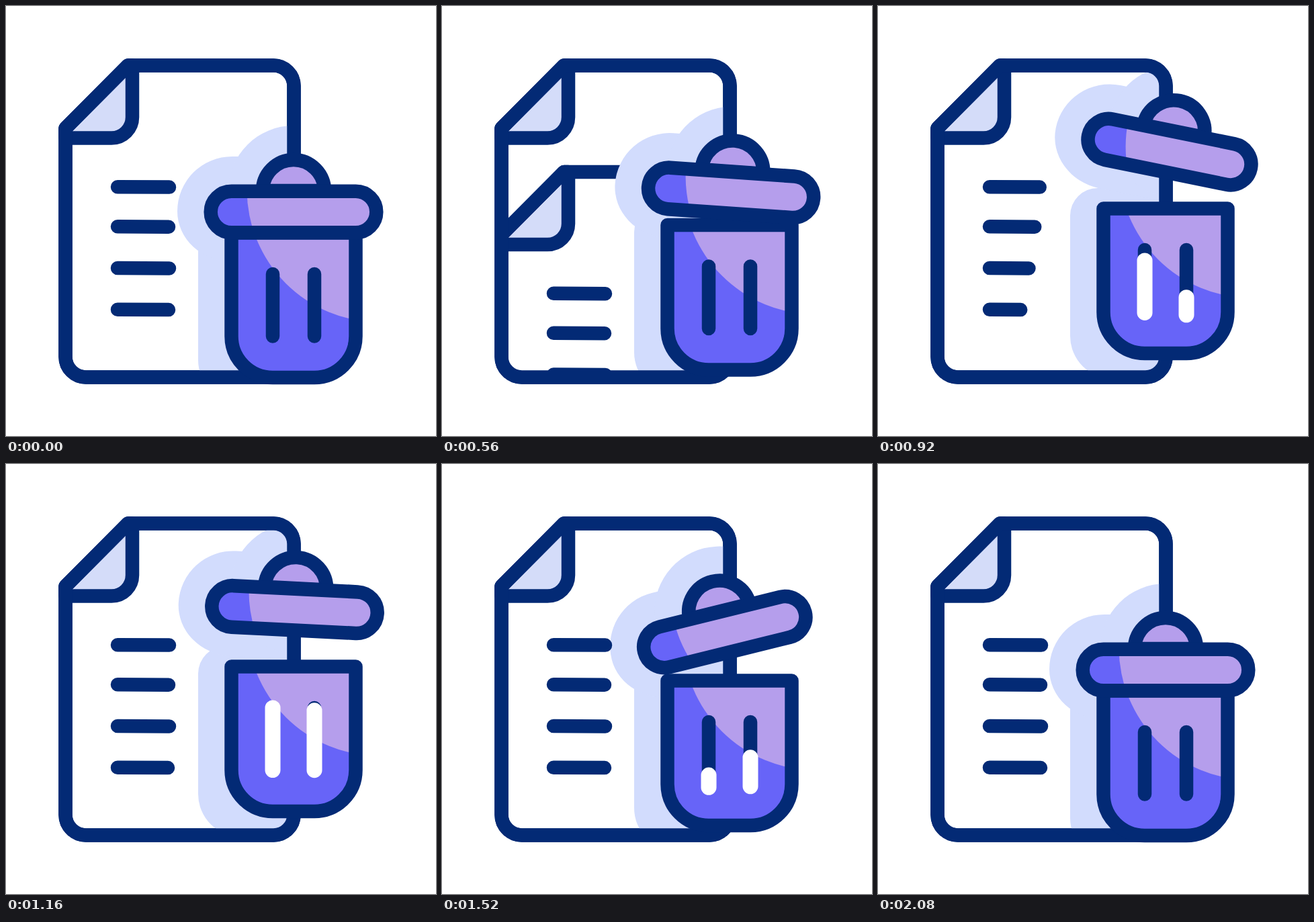
Animation, 640 px wide and 640 px high, one loop 2.4 s. Source, as an HTML page:

```html
<!DOCTYPE html>
<html lang="en">
<head>
<meta charset="utf-8">
<title>Delete document</title>
<style>
  html, body { margin: 0; width: 100%; height: 100%; overflow: hidden; background: #fff; }
  svg { display: block; width: 100%; height: 100%; }
  .ink { fill: none; stroke: #032a75; stroke-width: 20.5; stroke-linecap: round; stroke-linejoin: round; }
  .tongue { stroke: #fff; stroke-width: 23; }
  .paper { fill: #fff; }
  .fold { fill: #d4dcf9; }
  .shade { fill: #d2dcfd; }
  .deep { fill: #6764f8; }
  .light { fill: #b59eec; }
</style>
</head>
<body>
<svg viewBox="0 0 640 640">
  <defs>
    <path id="sheet" d="M181.5 88.5H398a30.5 30.5 0 0 1 30.5 30.5V522a30.5 30.5 0 0 1-30.5 30.5H119A30.5 30.5 0 0 1 88.5 522V182Z"/>
    <path id="flap" d="M188 88.5V165.500a31 31 0 0 1-31 31H88.500V182L181.500 88.500Z"/>
    <path id="can" d="M335.500 337.500H520.500V491.500a61.500 61.500 0 0 1-61.500 61.500H397a61.500 61.500 0 0 1-61.500-61.500Z"/>
    <rect id="cap" x="304.700" y="275.700" width="246.600" height="61.600" rx="30.800"/>
    <g id="page">
      <use href="#sheet" class="paper"/>
      <use href="#flap" class="fold"/>
      <use href="#flap" class="ink"/>
      <use href="#sheet" class="ink"/>
    </g>
    <clipPath id="inSheet"><use href="#sheet"/></clipPath>
    <clipPath id="inCan"><use href="#can"/></clipPath>
    <clipPath id="inCap"><use href="#cap"/></clipPath>
    <clipPath id="above"><rect id="reveal" width="640" height="640"/></clipPath>
  </defs>

  <use href="#page"/>
  <g clip-path="url(#inSheet)">
    <g id="falling">
      <use href="#page"/>
      <g id="oldLines" class="ink"></g>
    </g>
    <path class="shade" data-part="can" d="M286 348a41 41 0 0 1 41-41H560V591H350a64 64 0 0 1-64-64Z"/>
    <g class="shade" data-part="lid">
      <path d="M255 305.500A81.500 81.500 0 0 1 336.500 224H520V380.500H336.500A81.500 75 0 0 1 255 305.500Z"/>
      <circle cx="428" cy="275" r="97"/>
    </g>
  </g>
  <g clip-path="url(#above)"><g id="newLines" class="ink"></g></g>
  <use href="#sheet" class="ink"/>

  <g data-part="can">
    <use href="#can" class="deep"/>
    <g clip-path="url(#inCan)"><circle class="light" cx="556" cy="273" r="197.500"/></g>
    <use href="#can" class="ink"/>
    <path class="ink" d="M397 399V491.500M459 399V491.500"/>
    <g id="tongues"></g>
  </g>
  <g data-part="lid">
    <path class="light" d="M382 275a46 46 0 0 1 92 0Z"/>
    <path class="ink" d="M382 275a46 46 0 0 1 92 0Z"/>
    <use href="#cap" class="deep"/>
    <g clip-path="url(#inCap)"><circle class="light" cx="556" cy="273" r="197.500"/></g>
    <use href="#cap" class="ink"/>
  </g>
</svg>
<script>
const LOOP = 2400;
const $ = id => document.getElementById(id);
const parts = name => document.querySelectorAll(`[data-part=${name}]`);

// Each track is a list of [time, value] keys.
const canY = [[400, 0], [720, -27.7], [900, -36], [1160, -36], [1520, -15], [1760, -1.5], [1990, 0]];
const lidY = [[400, 0], [720, -69], [900, -90], [1160, -90], [1520, -57.4], [1760, -12], [2060, 0]];
const lidTurn = [[400, 0], [720, 9.3], [900, 11.6], [1160, 2.9], [1520, -13.9], [1760, -4.3], [2060, 0]];
const fills = [
  [[585, 0], [720, 0.226], [1025, 1], [1200, 1], [1520, 0.2], [1650, 0]],
  [[770, 0], [1160, 0.96], [1220, 1], [1300, 1], [1520, 0.467], [1750, 0]]
];

const clamp = x => Math.min(1, Math.max(0, x));
const smooth = x => (x = clamp(x), x * x * (3 - 2 * x));

// Monotone cubic interpolation: smooth, with no overshoot.
function sample(keys, t) {
  const last = keys.length - 1;
  if (t <= keys[0][0]) return keys[0][1];
  if (t >= keys[last][0]) return keys[last][1];
  const i = keys.findIndex(k => k[0] > t) - 1;
  const slope = j => (keys[j + 1][1] - keys[j][1]) / (keys[j + 1][0] - keys[j][0]);
  const tangent = j => {
    if (j === 0 || j === last) return 0;
    const a = slope(j - 1), b = slope(j);
    return a * b > 0 ? 2 * a * b / (a + b) : 0;
  };
  const h = keys[i + 1][0] - keys[i][0], u = (t - keys[i][0]) / h;
  return keys[i][1] + (keys[i + 1][1] - keys[i][1]) * smooth(u)
    + h * u * (1 - u) * ((1 - u) * tangent(i) - u * tangent(i + 1));
}

function addLine(parent, attrs) {
  const line = document.createElementNS("http://www.w3.org/2000/svg", "line");
  for (const key in attrs) line.setAttribute(key, attrs[key]);
  return parent.appendChild(line);
}

const rows = [269.2, 328.3, 390, 451.7];
const rowEnd = i => i % 2 ? 242 : 243;
const row = (parent, i) => addLine(parent, { x1: 166, y1: rows[i], x2: rowEnd(i), y2: rows[i] + 0.4 });
rows.forEach((y, i) => row($("oldLines"), i));
const newLines = rows.map((y, i) => row($("newLines"), i));
const tongues = [397, 459].map(x => addLine($("tongues"), { class: "ink tongue", x1: x, x2: x }));

const place = (name, transform) =>
  parts(name).forEach(el => el.setAttribute("transform", transform));

function draw(t) {
  const drop = 430 * Math.pow(Math.max(0, t - 220) / 500, 2.607);
  $("falling").setAttribute("transform", `translate(0 ${Math.min(drop, 640)})`);
  $("reveal").setAttribute("height", t < 220 ? 0 : 78 + drop);
  newLines.forEach((line, i) => {
    const p = smooth((t - 323 - 72 * i) / 667);
    line.setAttribute("x2", 166 + (rowEnd(i) - 166) * p);
  });

  place("can", `translate(0 ${sample(canY, t)})`);
  place("lid", `translate(0 ${sample(lidY, t)}) rotate(${sample(lidTurn, t)} 428 336.5)`);

  tongues.forEach((line, i) => {
    const p = sample(fills[i], t);
    line.style.display = p > 0 ? "" : "none";
    line.setAttribute("y1", 497.5 - 98.5 * p);
    line.setAttribute("y2", 497.5 - 6 * p);
  });
}

const start = performance.now();
function tick() {
  draw((performance.now() - start) % LOOP);
  requestAnimationFrame(tick);
}
tick();
</script>
</body>
</html>
```
